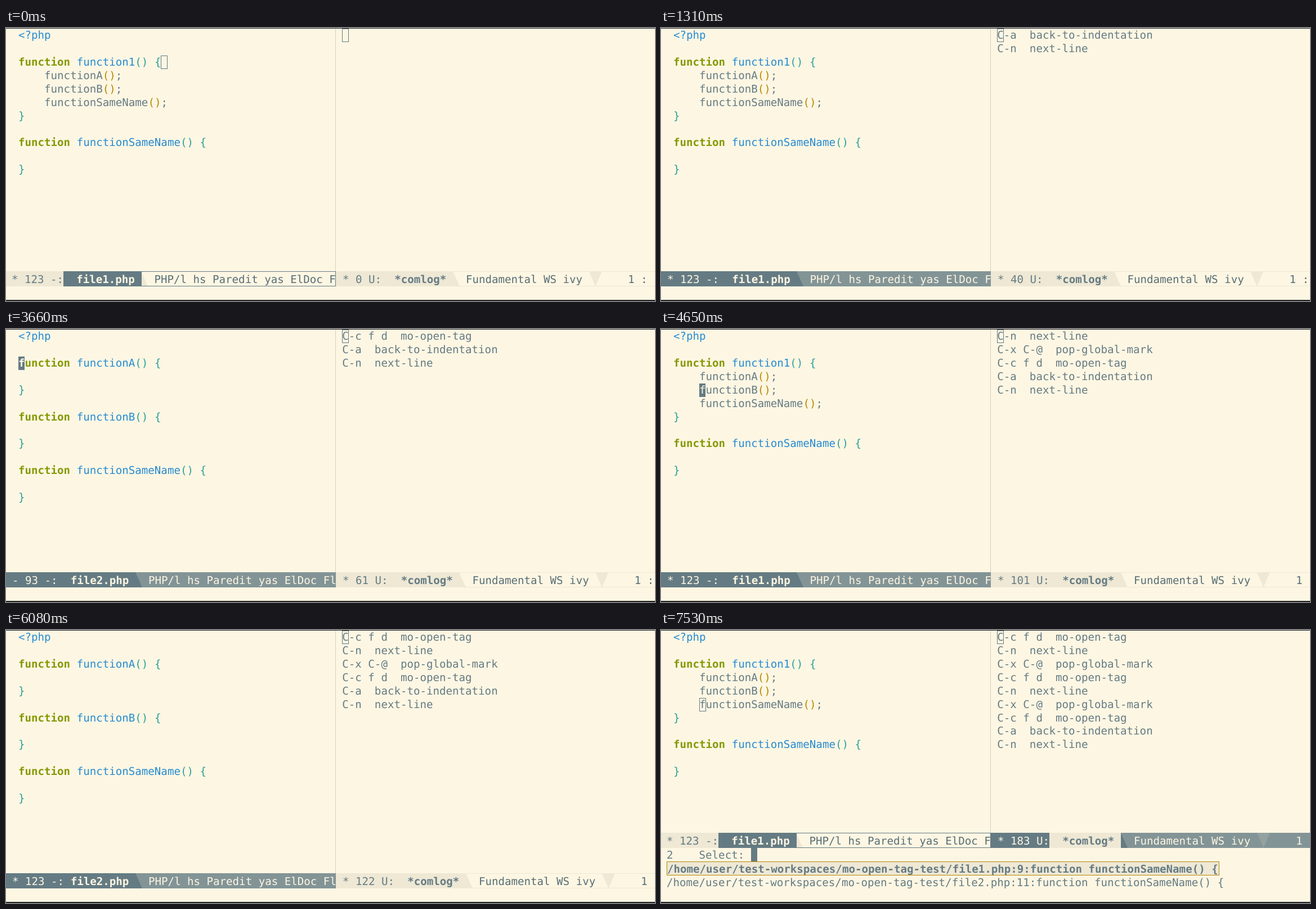
An HTML page with a canvas that plays this animation: 1153 by 486 pixels, repeating every 8000 ms.

```html
<!DOCTYPE html>
<html lang="en">
<head>
<meta charset="utf-8">
<title>Jump to definition</title>
<style>
  html, body { margin: 0; width: 100%; height: 100%; overflow: hidden; background: #fdf6e3; }
  canvas { display: block; }
</style>
</head>
<body>
<canvas id="stage" width="1153" height="486"></canvas>
<script>
const ctx = document.getElementById('stage').getContext('2d');
const LOOP = 8000, W = 1153, H = 486, SPLIT = 586;
const CHAR = 11.52, LINE = 23.92, BAR = 27;
const CREAM = '#fdf6e3', SAND = '#eee8d5', SLATE = '#657b83', DEEP = '#586e75', GREY = '#839496';
const GREEN = '#859900', BLUE = '#268bd2', CYAN = '#2aa198', GOLD = '#b58900';

const FILE1 = ['<?php', '', 'function function1() {', '    functionA();', '    functionB();',
  '    functionSameName();', '}', '', 'function functionSameName() {', '', '}'];
const FILE2 = ['<?php', '', 'function functionA() {', '', '}', '', 'function functionB() {', '', '}', '',
  'function functionSameName() {', '', '}'];

const NEXT = 'C-n  next-line', HOME = 'C-a  back-to-indentation';
const FIND = 'C-c f d  mo-open-tag', POP = 'C-x C-@  pop-global-mark';
const PATH = '/home/user/test-workspaces/mo-open-tag-test/';

// Each step changes part of the editor state; `log` adds one command on top.
const steps = [
  [0, { file: 1, row: 2, col: 22, cursor: 'hollow', focus: false, echo: '', status: '* 123 -:', select: false }],
  [230, { cursor: 'solid' }],
  [670, { row: 3, col: 16, focus: true }],
  [710, { log: NEXT }],
  [820, { col: 4 }],
  [860, { log: HOME }],
  [1310, { cursor: '' }],
  [1810, { cursor: 'solid' }],
  [2310, { cursor: '' }],
  [2620, { echo: 'Mark set' }],
  [2670, { echo: '', file: 2, status: '- 93 -:', row: 2, col: 0, cursor: 'solid', log: FIND }],
  [3140, { cursor: '' }],
  [3620, { echo: 'C-x-' }],
  [3660, { echo: '', cursor: 'solid' }],
  [3710, { file: 1, status: '* 123 -:', row: 3, col: 4, log: POP }],
  [4190, { cursor: '' }],
  [4600, { row: 4, cursor: 'solid' }],
  [4650, { log: NEXT }],
  [5210, { echo: 'Mark set' }],
  [5260, { echo: '', file: 2, status: '- 93 -:', row: 6, col: 0, log: FIND }],
  [5730, { cursor: '' }],
  [5990, { echo: 'C-x-' }],
  [6080, { echo: '', status: '* 123 -:' }],
  [6130, { file: 1, row: 4, col: 4, cursor: 'solid', log: POP }],
  [6580, { cursor: '' }],
  [6860, { row: 5, cursor: 'solid' }],
  [6910, { log: NEXT }],
  [7490, { echo: 'Mark set' }],
  [7530, { echo: '', cursor: 'hollow', focus: false, select: true, log: FIND }]
];

function stateAt(time) {
  const state = {}, logs = [];
  for (const [start, change] of steps) {
    if (start > time) break;
    Object.assign(state, change);
    if (change.log) logs.unshift(change.log);
  }
  state.logs = logs;
  return state;
}

function rect(x, y, w, h, color) {
  ctx.fillStyle = color;
  ctx.fillRect(x, y, w, h);
}

function outline(x, y, w, h, color) {
  ctx.strokeStyle = color;
  ctx.lineWidth = 1;
  ctx.strokeRect(Math.round(x) + .5, Math.round(y) + .5, Math.round(w) - 1, Math.round(h) - 1);
}

function triangle(color, ...points) {
  ctx.fillStyle = color;
  ctx.beginPath();
  for (const [x, y] of points) ctx.lineTo(x, y);
  ctx.fill();
}

function text(str, x, baseline, color = SLATE, bold = false) {
  ctx.font = `${bold ? 'bold ' : ''}19.135px "DejaVu Sans Mono", monospace`;
  ctx.fillStyle = color;
  ctx.fillText(str, x, baseline);
}

const rowTop = row => 1 + row * LINE;
const baselineOf = row => rowTop(row) + 18;

function codeLine(line, row) {
  const outer = !line.startsWith(' ');
  const bracket = outer ? CYAN : GOLD;
  for (const { 0: token, index } of line.matchAll(/<\?php|\w+|[(){}]+|;/g)) {
    const keyword = token === 'function';
    const color = keyword ? GREEN
      : /[(){}]/.test(token) ? bracket
      : outer ? BLUE : SLATE;
    text(token, 22 + index * CHAR, baselineOf(row), color, keyword);
  }
}

function cursor(kind, x, row, char = '', bold = false) {
  const y = Math.round(rowTop(row));
  if (kind === 'hollow') outline(x, y, 12, 24, SLATE);
  if (kind === 'solid') {
    rect(Math.round(x), y, 11, 24, SLATE);
    text(char, x, baselineOf(row), CREAM, bold);
  }
}

const ACTIVE = { bg: SLATE, fg: CREAM, body: GREY, bodyFg: CREAM, wedge: '#93a1a1' };
const INACTIVE = { bg: SAND, fg: SLATE, body: CREAM, bodyFg: DEEP, wedge: SAND };

function modeLine({ left, right, x, top, face, nameFace, status, name, nameCol, modes, tail }) {
  const at = col => x + col * CHAR, bottom = top + BAR, baseline = top + 20.5;
  const sep = Math.round(at(nameCol + name.length + 1));
  const modesCol = nameCol + name.length + 3;
  ctx.save();
  ctx.beginPath();
  ctx.rect(left, top, right - left, BAR);
  ctx.clip();
  rect(left, top, right - left, BAR, face.body);
  rect(left, top, sep - left, BAR, nameFace.bg);
  if (face !== nameFace) rect(left, top, Math.round(at(8)) - left, BAR, face.bg);
  triangle(face.bg, [sep, top], [sep, bottom], [sep + 12, bottom]);
  if (face === INACTIVE) outline(sep, top, right - sep, BAR, nameFace.bg);
  text(status, x, baseline, face.fg);
  text(name, at(nameCol), baseline, nameFace.fg, true);
  text(modes, at(modesCol), baseline, face.bodyFg);
  if (tail) {
    const col = modesCol + modes.length + 1;
    triangle(face.wedge, [at(col), top], [at(col + 2), top], [at(col + 1), bottom]);
    text(tail, at(col + 6), baseline, face.bodyFg);
  }
  ctx.restore();
}

function selectionPrompt() {
  text('2    Select: ', 10, 406.5);
  rect(160, 388, 11, 24, SLATE);
  rect(10, 412, 982, 25, SAND);
  outline(10, 412, 982, 25, GOLD);
  text(PATH + 'file1.php:9:function functionSameName() {', 11, 431.5, SLATE, true);
  text(PATH + 'file2.php:11:function functionSameName() {', 10, 456);
}

function draw(time) {
  const s = stateAt(time);
  const lines = s.file === 1 ? FILE1 : FILE2;
  const barTop = s.select ? 361 : 433;
  rect(0, 0, W, H, CREAM);
  rect(585, 1, 1, barTop - 1, '#d5cfbf');

  lines.forEach(codeLine);
  cursor(s.cursor, 22 + s.col * CHAR, s.row, lines[s.row][s.col], s.col === 0);

  s.logs.forEach((entry, row) => text(entry, 597.3, baselineOf(row)));
  cursor('hollow', 597, 0);

  modeLine({
    left: 0, right: SPLIT, x: s.focus ? 11 : 10, top: barTop,
    face: s.focus ? ACTIVE : INACTIVE, nameFace: ACTIVE,
    status: s.status, name: `file${s.file}.php`, nameCol: s.file === 1 ? 10 : 9,
    modes: 'PHP/l hs Paredit yas ElDoc Flymake'
  });

  const size = s.logs.reduce((sum, entry) => sum + entry.length + 1, 0);
  const logStatus = `* ${size} U:`;
  modeLine({
    left: SPLIT, right: W + 2, x: 598, top: barTop,
    face: s.select ? ACTIVE : INACTIVE, nameFace: INACTIVE,
    status: logStatus, name: '*comlog*', nameCol: logStatus.length + 2,
    modes: 'Fundamental WS ivy', tail: '1 :'
  });

  text(s.echo, 10, 478);
  if (s.select) selectionPrompt();
  rect(0, 0, W, 1, '#222');
  rect(0, 484, W, 2, '#222');
}

ctx.textRendering = 'geometricPrecision';
const begin = performance.now();
function tick() {
  draw((performance.now() - begin) % LOOP);
  requestAnimationFrame(tick);
}
tick();
</script>
</body>
</html>
```
